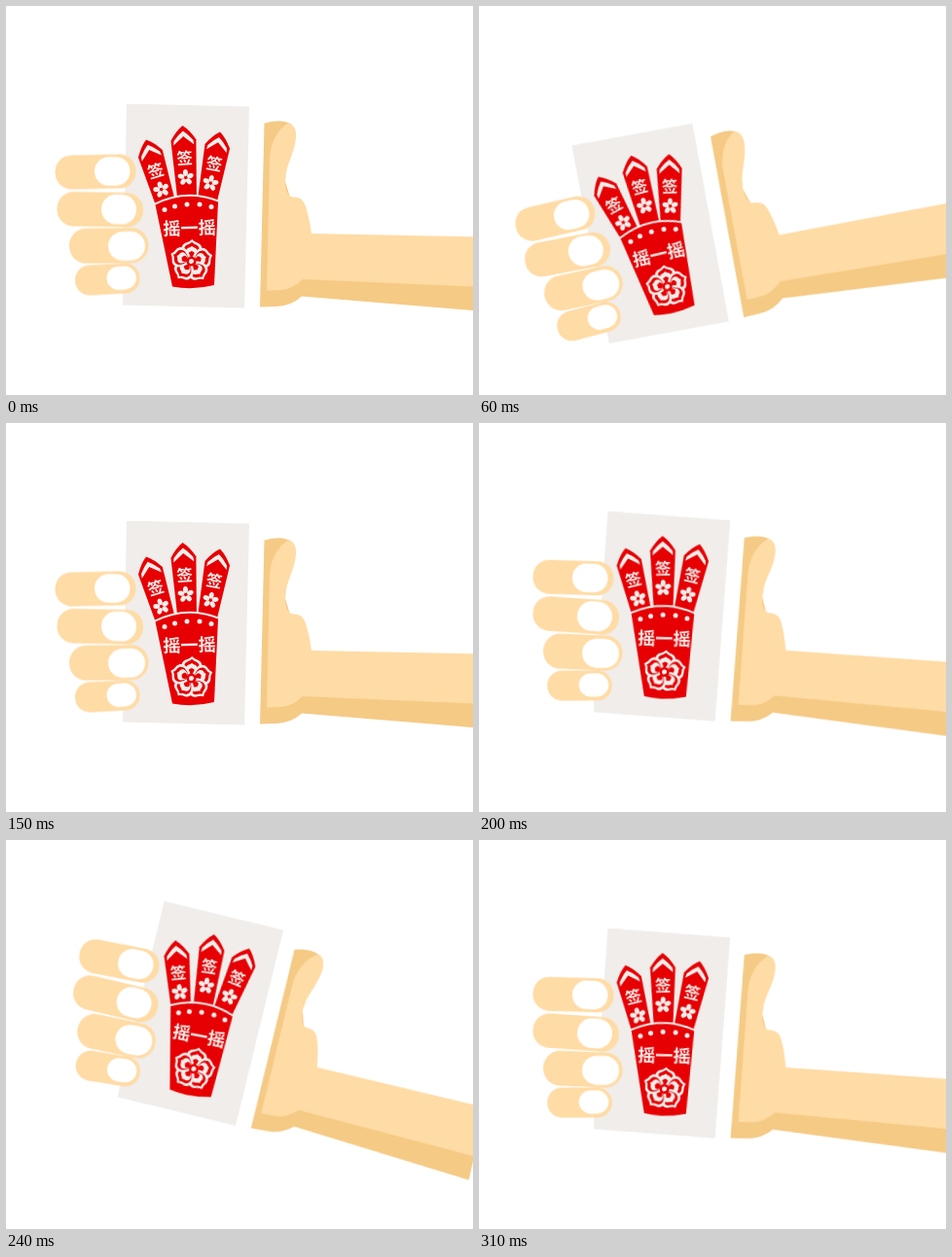
Animation, 480 px wide and 400 px high, one loop 330 ms. Source, as an HTML page:

```html
<!DOCTYPE html>
<html lang="zh">
<head>
<meta charset="utf-8">
<title>摇一摇</title>
<style>
  html, body { margin: 0; width: 100%; height: 100%; overflow: hidden; background: #fff; }
  svg { display: block; width: 480px; height: 400px; }
  .skin { fill: #ffdba5; }
  .shade { fill: #f5ca85; }
  .nail { fill: #fff; }
  .red { fill: #e60004; }
  .paper { fill: #f0edea; }
  text { font-family: "Noto Sans CJK SC", "Noto Sans CJK", sans-serif; font-weight: 700; text-anchor: middle; }

  /* Shake around the wrist: hard steps, pausing at both extremes and in the middle */
  #arm {
    transform-box: view-box;
    transform-origin: 318px 260px;
    animation: shake 330ms step-end infinite;
  }
  @keyframes shake {
    0%, 45.45% { transform: rotate(0deg); }
    6.06%, 39.39% { transform: rotate(-2.2deg); }
    12.12%, 33.33% { transform: rotate(-7deg); }
    18.18% { transform: rotate(-11.8deg); }
    60.6%, 93.93% { transform: rotate(2.95deg); }
    66.66%, 87.87% { transform: rotate(7.6deg); }
    72.72% { transform: rotate(12.3deg); }
    100% { transform: rotate(0deg); }
  }
</style>
</head>
<body>
<svg viewBox="0 -.5 480 400">
  <defs>
    <ellipse id="petal" cy="-4.9" rx="2.5" ry="3.4"/>
    <g id="blossom" class="paper">
      <use href="#petal"/>
      <use href="#petal" transform="rotate(72)"/>
      <use href="#petal" transform="rotate(144)"/>
      <use href="#petal" transform="rotate(216)"/>
      <use href="#petal" transform="rotate(288)"/>
    </g>
    <g id="stick">
      <path class="red" d="M-13 15Q-7 5 0 0Q7 5 13 15L10 72H-10Z"/>
      <path class="paper" d="M-10.5 20L-10 15.5Q-5 9 0 5.500Q5 9 10 15.5L10.500 20L0 11Z"/>
      <text class="paper" y="39.500" font-size="16.5">签</text>
      <use href="#blossom" y="53.500"/>
    </g>
    <path id="leaf" d="M0 0C-13 -7 -12 -16 -7 -18.500Q-2 -20 0 -22.500Q2 -20 7 -18.500C12 -16 13 -7 0 0Z"/>
    <g id="bigPetal">
      <use href="#leaf" class="paper"/>
      <use href="#leaf" class="red" transform="translate(0 -3) scale(.74)"/>
      <use href="#leaf" class="paper" transform="translate(0 -3.500) scale(.55)"/>
      <use href="#leaf" class="red" transform="translate(0 -4) scale(.3)"/>
    </g>
  </defs>

  <g id="arm">
    <path class="paper" d="M124 100L250 103L245 310L120 307Z"/>

    <use href="#stick" transform="translate(144 137) rotate(-17)"/>
    <use href="#stick" transform="translate(220 129) rotate(10.500)"/>
    <use href="#stick" transform="translate(181.500 122.500) rotate(-3.500)"/>
    <path d="M153.500 204Q185 188 218 201L214 286.500Q192 292 171 288Z" fill="#e60004" stroke="#f0edea" stroke-width="4" paint-order="stroke"/>
    <g class="paper">
      <circle cx="163" cy="209" r="2.500"/>
      <circle cx="173.500" cy="205.500" r="2.500"/>
      <circle cx="186" cy="203.500" r="2.500"/>
      <circle cx="199" cy="203.500" r="2.500"/>
      <circle cx="211" cy="206" r="2.500"/>
      <text x="188.500" y="234.500" font-size="18.200" transform="rotate(-1.600 189 228)">摇一摇</text>
    </g>
    <g transform="translate(190.500 262) rotate(2)">
      <use href="#bigPetal"/>
      <use href="#bigPetal" transform="rotate(72)"/>
      <use href="#bigPetal" transform="rotate(144)"/>
      <use href="#bigPetal" transform="rotate(216)"/>
      <use href="#bigPetal" transform="rotate(288)"/>
      <circle class="red" r="5"/>
      <circle class="paper" r="2.500"/>
    </g>

    <g transform="rotate(-1 92 170)">
      <rect class="skin" x="50.500" y="152.500" width="83" height="35" rx="17"/>
      <rect class="nail" x="91" y="155" width="36.500" height="29.500" rx="14.500"/>
    </g>
    <g transform="rotate(1 97 208.500)">
      <rect class="skin" x="52.500" y="191" width="88.500" height="35.500" rx="17"/>
      <rect class="nail" x="98" y="193" width="36" height="30.500" rx="15"/>
    </g>
    <g transform="rotate(-.5 106 246)">
      <rect class="skin" x="65" y="228" width="81.500" height="36" rx="17.500"/>
      <rect class="nail" x="105" y="231.500" width="38" height="30" rx="15"/>
    </g>
    <g transform="rotate(-3 104 280.500)">
      <rect class="skin" x="71" y="265" width="66.500" height="31" rx="15"/>
      <rect class="nail" x="103.500" y="268" width="30.500" height="24" rx="12"/>
    </g>

    <path class="shade" d="M265.500 120Q279 116.500 287 118.500L291 120L287 180L304 236L492 240L491 313.500L304 298Q293 308 278 308.500L261 309Z"/>
    <path class="skin" d="M291 119.500Q299 123 298 135C296 154 287 162 287 182Q288 196 296 196Q304 196 307 203Q311 213 314 233.500L492 237V288.500L305 280.500Q294 291 283 291.500L268 292L271 158C271 141 279 126 291 119.500Z"/>
  </g>
</svg>
</body>
</html>
```
